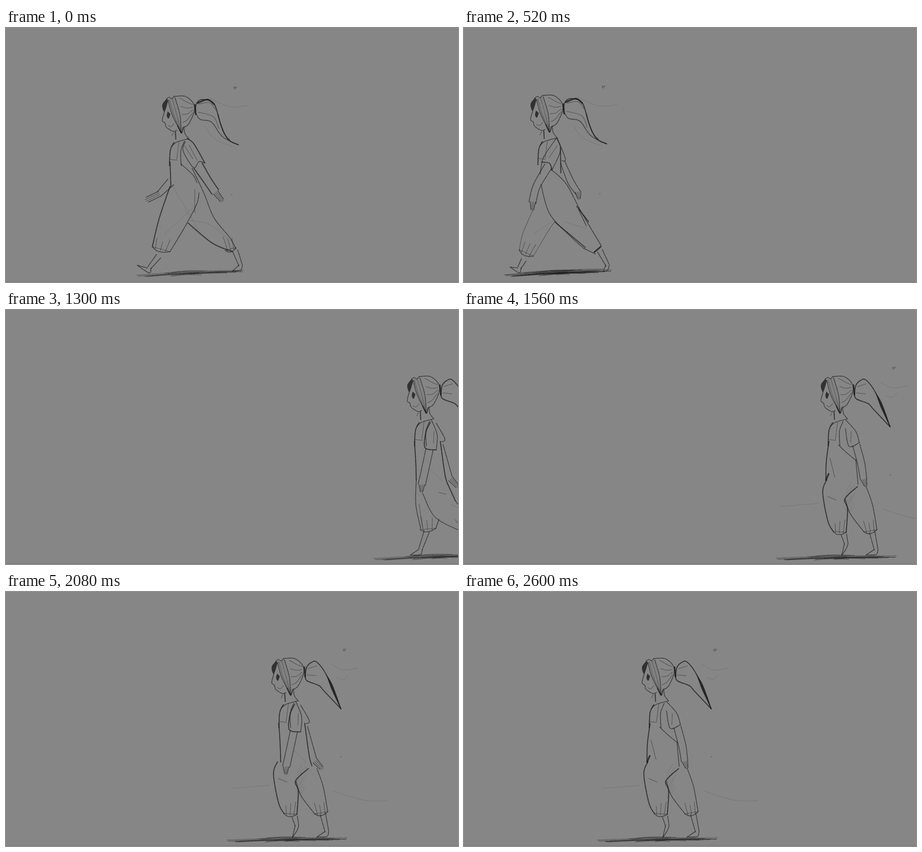
These frames come from a looping animation (998 by 561 pixels, 2730 ms). An HTML page with a canvas:

```html
<!DOCTYPE html>
<html lang="en">
<head>
<meta charset="utf-8">
<title>Walk cycle sketch</title>
<style>
html, body { margin: 0; width: 100%; height: 100%; overflow: hidden; background: #868686; }
canvas { display: block; }
</style>
</head>
<body>
<canvas id="stage" width="998" height="561"></canvas>
<script>
const ctx = document.getElementById('stage').getContext('2d');
const STEP = 130, STEPS = 21;
const WIDTH = [0.7, 1.1, 1.6, 2.2, 3.6];
const ALPHA = [0.3, 0.5, 0.66, 0.76, 0.82];

let seed;
function rand() {
  seed = (seed * 16807) % 2147483647;
  return seed / 2147483647;
}

function curve(p) {
  const path = new Path2D(), last = p.length / 2 - 1;
  const at = (i, axis) => p[2 * Math.max(0, Math.min(last, i)) + axis];
  const handle = (i, side, axis) => at(i, axis) + side * (at(i + 1, axis) - at(i - 1, axis)) / 6;
  path.moveTo(p[0], p[1]);
  for (let i = 0; i < last; i++) {
    path.bezierCurveTo(handle(i, 1, 0), handle(i, 1, 1), handle(i + 1, -1, 0), handle(i + 1, -1, 1), at(i + 1, 0), at(i + 1, 1));
  }
  return path;
}

// A solid pass with a broken, slightly shifted one for pencil grain
function line(weight, ...points) {
  const path = curve(points);
  ctx.globalAlpha = ALPHA[weight] * 0.8;
  ctx.lineWidth = WIDTH[weight];
  ctx.stroke(path);
  if (!weight) return;
  ctx.save();
  ctx.translate(rand() * 1.4 - 0.7, rand() * 1.2 - 0.6);
  ctx.setLineDash([5 + rand() * 9, 2, 3 + rand() * 5, 3]);
  ctx.globalAlpha *= 0.65;
  ctx.lineWidth *= 0.7;
  ctx.stroke(path);
  ctx.restore();
}

function blob(...points) {
  ctx.globalAlpha = 0.8;
  ctx.fill(curve(points));
}

// Both edges of a tube through joints given as x, y, half width
function limb(weight, ...joints) {
  const n = joints.length / 3, left = [], right = [];
  for (let i = 0; i < n; i++) {
    const a = 3 * Math.max(0, i - 1), b = 3 * Math.min(n - 1, i + 1);
    const dir = Math.atan2(joints[b + 1] - joints[a + 1], joints[b] - joints[a]);
    const [x, y, r] = joints.slice(3 * i, 3 * i + 3);
    const dx = -Math.sin(dir) * r, dy = Math.cos(dir) * r;
    left.push(x + dx, y + dy);
    right.push(x - dx, y - dy);
  }
  line(weight, ...left);
  line(weight, ...right);
}

function hand(x, y, degrees, length) {
  const dir = degrees * Math.PI / 180;
  for (let i = -1.5; i <= 1.5; i++) {
    const a = dir + i * 0.13, reach = length * (1 - Math.abs(i) * 0.1);
    line(Math.abs(i) > 1 ? 2 : 1, x - Math.sin(dir) * i * 4, y + Math.cos(dir) * i * 4, x + Math.cos(a) * reach, y + Math.sin(a) * reach);
  }
}

// Gathered trouser end with pleats rising from it
function cuff(x0, y0, x1, y1) {
  const dx = x1 - x0, dy = y1 - y0, d = Math.hypot(dx, dy), ux = dy / d, uy = -dx / d;
  line(2, x0, y0, x0 + dx * 0.3 - ux * 6, y0 + dy * 0.3 - uy * 6, x0 + dx * 0.7 - ux * 5, y0 + dy * 0.7 - uy * 5, x1, y1);
  line(1, x0, y0, (x0 + x1) / 2, (y0 + y1) / 2, x1, y1);
  for (let t = 0.2; t < 0.9; t += 0.28) {
    const x = x0 + dx * t, y = y0 + dy * t, h = 16 + rand() * 16;
    line(1, x - ux * 3, y - uy * 3, x + ux * h + dx * (t - 0.5) * 0.3, y + uy * h);
  }
}

function shin(x, y, heelX, heelY, toeX, toeY) {
  limb(2, x, y, 6, heelX, heelY - 6, 4);
  line(2, heelX - 4, heelY - 6, toeX, toeY);
  line(2, toeX, toeY, heelX, heelY + 5, heelX + 4, heelY - 6);
}

function ground(x0, y0, x1, y1, count) {
  const w = x1 - x0, h = y1 - y0;
  for (let i = 0; i < count; i++) {
    const a = i ? rand() * 0.5 : 0, b = i ? 0.55 + rand() * 0.45 : 1, c = (a + b) / 2;
    const y = y0 + (i ? rand() * 9 - 3 : 0);
    line(1, x0 + a * w, y + a * h, x0 + c * w, y + c * h - 2, x0 + b * w, y + b * h);
  }
}

function hatch(x, y, w, h) {
  for (let i = 0; i < 10; i++) {
    const top = y + h * i / 10;
    line(0, x, top + 12, x + w * (0.5 + rand() * 0.5), top - 8);
  }
}

function head() {
  line(2, 695, 180, 690, 200, 696, 206, 699, 215, 713, 224, 722, 222);
  line(1, 703, 211, 709, 214, 716, 207);
  blob(702, 180, 700, 190, 704, 196, 708, 186);
  blob(700, 152, 690, 166, 695, 181, 703, 157);
  line(2, 699, 153, 705, 149, 711, 152, 716, 147);
  line(2, 716, 147, 741, 147, 759, 163, 760, 182, 748, 208, 738, 215);
  for (let i = 0; i < 6; i++) {
    line(i % 5 ? i % 2 : 2, 703 + 3 * i, 155 - i, 712 + 3.4 * i, 188, 732, 228);
  }
  for (let i = 0; i < 4; i++) {
    line(1, 729 + 2 * i, 151 + 18 * i, 745, 160 + 13 * i, 757, 165 + 6 * i);
  }
  line(3, 724, 212, 732, 228, 736, 216);
  line(3, 719, 225, 720, 242);
  line(1, 715, 226, 711, 234);
  line(2, 738, 214, 740, 229, 749, 241);
  line(4, 762, 166, 764, 187);
  line(1, 848, 127, 854, 126, 850, 131, 848, 127);
  line(1, 842, 364, 844, 364);
}

function chest(strap) {
  line(2, 711, 257, 722, 248, 747, 241);
  line(3, 716, 249, 708, 266, 706, 300);
  line(1, 707, 286, 723, 288);
  line(1, 727, 247, 722, 286);
  if (strap) line(2, 739, 246, 731, 268, 732, 300);
}

const tails = {
  loose() {
    line(3, 418, 188, 420, 168, 433, 158, 459, 167, 474, 213, 490, 246, 513, 258);
    line(4, 423, 166, 445, 158, 459, 168);
    line(2, 513, 258, 478, 240, 454, 208, 429, 202, 420, 190);
    line(2, 468, 190, 480, 230, 495, 248);
    line(1, 426, 168, 450, 165, 463, 181);
    line(1, 425, 186, 458, 196, 470, 222);
    line(0, 450, 155, 495, 174, 536, 171);
    line(0, 440, 218, 461, 245, 500, 262);
  },
  full() {
    line(3, 764, 187, 767, 167, 777, 156, 790, 155, 812, 185, 843, 258);
    line(3, 843, 258, 806, 219, 795, 207, 768, 196, 764, 184);
    blob(810, 181, 825, 206, 843, 258, 821, 213);
    line(1, 771, 169, 790, 163);
    line(1, 768, 183, 788, 185);
    line(0, 823, 160, 848, 172, 880, 168);
    line(0, 833, 189, 848, 193, 858, 184);
  },
  thin() {
    line(3, 117, 187, 119, 163, 130, 150, 147, 151);
    line(2, 147, 151, 178, 183, 197, 240, 210, 256);
    line(2, 210, 256, 187, 230, 172, 206, 131, 199, 117, 178);
    line(1, 124, 161, 149, 153);
    line(0, 175, 153, 205, 166, 236, 161);
    line(0, 187, 185, 201, 188, 214, 179);
  }
};

const bodies = {
  backArm() {
    line(3, 400, 244, 415, 256, 439, 298);
    line(2, 439, 298, 426, 295, 414, 308, 391, 271, 396, 251);
    line(1, 394, 260, 413, 289);
    line(1, 404, 258, 422, 292);
    limb(3, 424, 304, 11, 445, 337, 9, 462, 362, 9);
    hand(463, 363, 52, 27);
    limb(2, 364, 340, 9, 338, 367, 6);
    hand(339, 366, 154, 36);
    line(3, 362, 296, 364, 350);
    line(2, 386, 300, 413, 325, 422, 342);
    line(2, 411, 310, 437, 365, 459, 419, 494, 463, 508, 488);
  },
  frontArm() {
    line(2, 204, 243, 178, 281, 172, 296);
    line(3, 172, 296, 189, 299, 194, 314);
    line(2, 194, 314, 213, 270, 204, 243);
    line(2, 206, 243, 224, 289, 216, 293);
    line(3, 213, 265, 214, 320);
    line(1, 187, 287, 206, 260);
    limb(2, 186, 305, 9, 160, 350, 8, 151, 386, 8);
    hand(152, 384, 94, 20);
    limb(2, 218, 297, 5, 236, 340, 7, 252, 364, 6);
    hand(252, 362, 82, 18);
    line(2, 172, 295, 168, 323);
  },
  midArm() {
    line(2, 61, 290, 62, 312, 60, 340);
    line(2, 95, 235, 112, 256, 116, 294);
    line(2, 116, 294, 96, 295, 84, 298, 83, 270, 92, 240);
    line(1, 113, 255, 118, 290, 124, 346);
    limb(2, 104, 294, 7, 103, 330, 7, 95, 374, 6);
    hand(93, 374, 110, 24);
    line(3, 60, 343, 71, 372);
    line(2, 121, 345, 104, 391, 92, 408);
  },
  nearArm() {
    line(3, 499, 290, 502, 340, 503, 376);
    line(2, 536, 242, 549, 275, 547, 309);
    line(3, 547, 309, 522, 304, 524, 270, 534, 248);
    line(2, 547, 250, 566, 284, 559, 291);
    line(1, 542, 268, 541, 294);
    limb(2, 532, 308, 8, 523, 350, 8, 515, 386, 8);
    hand(515, 386, 92, 18);
    line(3, 556, 290, 566, 362, 572, 384);
    line(2, 562, 297, 577, 350, 582, 368);
    hand(579, 373, 48, 26);
    line(0, 532, 350, 560, 378);
  },
  swungArm() {
    line(3, 707, 300, 711, 378);
    line(1, 707, 330, 700, 355, 707, 387);
    line(2, 744, 243, 760, 255, 774, 284);
    line(2, 740, 262, 748, 304, 774, 297);
    line(1, 743, 251, 751, 274);
    limb(2, 760, 297, 9, 770, 322, 8, 781, 372, 5);
    hand(782, 373, 43, 29);
    line(1, 759, 324, 775, 318);
    line(2, 766, 335, 774, 380);
    line(1, 742, 328, 714, 368);
  },
  looseArm() {
    line(3, 411, 290, 405, 335, 404, 375);
    line(4, 404, 376, 410, 362);
    line(2, 448, 243, 470, 268, 478, 293);
    line(2, 478, 293, 455, 301, 447, 262);
    line(1, 460, 268, 459, 293);
    limb(2, 471, 298, 8, 482, 340, 8, 487, 374, 7);
    hand(488, 374, 75, 18);
    line(2, 432, 298, 446, 312, 470, 332);
    line(2, 470, 331, 475, 385);
    line(1, 413, 327, 424, 370);
  }
};

const legs = {
  nearReach() {
    ground(289, 546, 524, 535, 13);
    line(3, 362, 350, 338, 421, 323, 483);
    cuff(323, 483, 362, 494);
    line(2, 362, 494, 395, 439, 421, 389, 426, 364);
    line(1, 417, 357, 417, 408);
    line(3, 402, 431, 455, 475, 500, 494);
    cuff(484, 491, 508, 485);
    shin(337, 504, 316, 536, 290, 524);
    shin(506, 492, 518, 530, 500, 537);
    line(0, 365, 345, 425, 445);
    line(0, 405, 425, 450, 434, 489, 465);
    line(0, 350, 455, 420, 390);
  },
  nearTrail() {
    ground(90, 545, 326, 534, 24);
    line(2, 170, 345, 189, 410, 235, 460, 265, 487);
    line(3, 201, 429, 268, 485);
    line(2, 265, 487, 290, 499);
    line(4, 288, 495, 302, 483);
    line(2, 303, 481, 258, 405, 226, 345, 193, 313);
    line(3, 249, 394, 275, 428);
    line(2, 253, 401, 270, 437);
    shin(300, 492, 317, 530, 308, 538);
    line(1, 153, 400, 130, 453, 122, 490);
    cuff(122, 490, 153, 504);
    line(1, 153, 504, 185, 450, 200, 428);
    shin(132, 512, 122, 536, 102, 528);
    line(0, 222, 428, 270, 443);
    line(0, 154, 455, 199, 424);
  },
  lifted() {
    ground(8, 552, 156, 547, 11);
    hatch(62, 405, 24, 38);
    line(2, 60, 340, 38, 400, 36, 434);
    line(3, 36, 434, 80, 450, 128, 466);
    line(2, 121, 346, 129, 400, 129, 430);
    line(2, 62, 405, 100, 411, 137, 447);
    cuff(128, 466, 137, 447);
    shin(132, 455, 158, 474, 154, 503);
    line(2, 85, 455, 96, 491);
    cuff(96, 491, 130, 492);
    line(2, 130, 492, 131, 466);
    shin(116, 496, 119, 536, 96, 543);
  },
  trailing() {
    ground(409, 549, 676, 539, 14);
    line(2, 503, 376, 502, 430, 513, 483);
    line(1, 509, 429, 517, 480);
    line(2, 517, 405, 545, 458, 605, 490);
    line(3, 572, 384, 589, 421);
    line(2, 589, 421, 626, 473);
    cuff(605, 490, 626, 473);
    line(1, 553, 403, 569, 407);
    shin(624, 483, 646, 504, 650, 526);
    cuff(511, 485, 546, 482);
    line(2, 546, 482, 553, 462);
    shin(526, 489, 512, 535, 490, 541);
    line(0, 580, 430, 640, 453, 735, 461);
    line(0, 600, 440, 712, 474);
  },
  farTrail() {
    line(3, 711, 378, 709, 430, 717, 481);
    line(2, 774, 360, 768, 400, 752, 475);
    cuff(716, 482, 750, 482);
    line(2, 775, 386, 805, 430, 832, 476);
    line(2, 824, 488, 805, 488, 760, 465);
    cuff(812, 489, 832, 474);
    shin(830, 486, 853, 506, 857, 526);
    shin(732, 489, 718, 536, 697, 542);
    line(0, 600, 433, 650, 428, 783, 428, 918, 474);
    line(0, 740, 428, 790, 420, 860, 449, 943, 461);
  },
  stepping() {
    ground(294, 548, 560, 543, 15);
    hatch(449, 388, 22, 60);
    line(3, 406, 375, 397, 402, 408, 465, 420, 489);
    cuff(420, 489, 449, 491);
    line(3, 449, 491, 452, 440, 446, 417, 474, 390);
    line(2, 447, 418, 458, 450, 488, 490);
    cuff(488, 490, 517, 485);
    line(2, 517, 485, 507, 430, 493, 390);
    line(1, 408, 412, 427, 420);
    shin(444, 496, 449, 522, 439, 542);
    shin(506, 490, 515, 535, 493, 541);
    line(0, 304, 434, 388, 427);
    line(0, 530, 440, 598, 460, 648, 461);
  }
};

// Where the nose sits in the coordinates of each part
const origin = {
  backArm: 345, frontArm: 147, midArm: 42, nearArm: 483, swungArm: 690, looseArm: 393,
  nearReach: 345, nearTrail: 147, lifted: 42, trailing: 483, farTrail: 690, stepping: 393,
  loose: 345, full: 690, thin: 42
};
const tailLift = { loose: 4, full: 0, thin: -7 };

// Body, legs, ponytail and head height for the eight steps of the cycle
const cycle = [
  ['backArm', 'nearReach', 'loose', 4],
  ['swungArm', 'farTrail', 'full', 0],
  ['midArm', 'lifted', 'thin', -7],
  ['nearArm', 'stepping', 'full', 0],
  ['frontArm', 'nearTrail', 'loose', 2],
  ['nearArm', 'trailing', 'full', 0],
  ['midArm', 'lifted', 'thin', -7],
  ['looseArm', 'stepping', 'full', 0]
];

// Step number and position of the nose
const track = [[0, 985], [2, 886], [6, 690], [10, 483], [12, 393], [13, 345], [17, 147], [19, 42], [20, -9]];

function noseAt(n) {
  const i = Math.max(1, track.findIndex(k => k[0] >= n));
  const [a, xa] = track[i - 1], [b, xb] = track[i];
  return xa + (xb - xa) * (n - a) / (b - a);
}

function placed(dx, dy, draw) {
  ctx.save();
  ctx.translate(dx, dy);
  draw();
  ctx.restore();
}

function render(index) {
  const n = (index + 13) % STEPS, x = noseAt(n);
  const [body, leg, tail, lift] = cycle[(n + 3) % 8];
  seed = 77;
  ctx.globalAlpha = 1;
  ctx.fillStyle = '#868686';
  ctx.fillRect(0, 0, 998, 561);
  ctx.fillStyle = '#747474';
  ctx.fillRect(0, 560, 998, 1);
  ctx.fillStyle = ctx.strokeStyle = '#1b1b1b';
  ctx.lineCap = ctx.lineJoin = 'round';

  placed(x - origin[leg], 0, legs[leg]);
  placed(x - origin[body], 0, bodies[body]);
  placed(x - origin[tail], lift - tailLift[tail], tails[tail]);
  placed(x - 690, lift, () => {
    head();
    chest(body !== 'frontArm');
  });
}

let shown = -1;
function tick() {
  const index = Math.floor(performance.now() / STEP) % STEPS;
  if (index !== shown) render(shown = index);
  requestAnimationFrame(tick);
}
tick();
</script>
</body>
</html>
```
